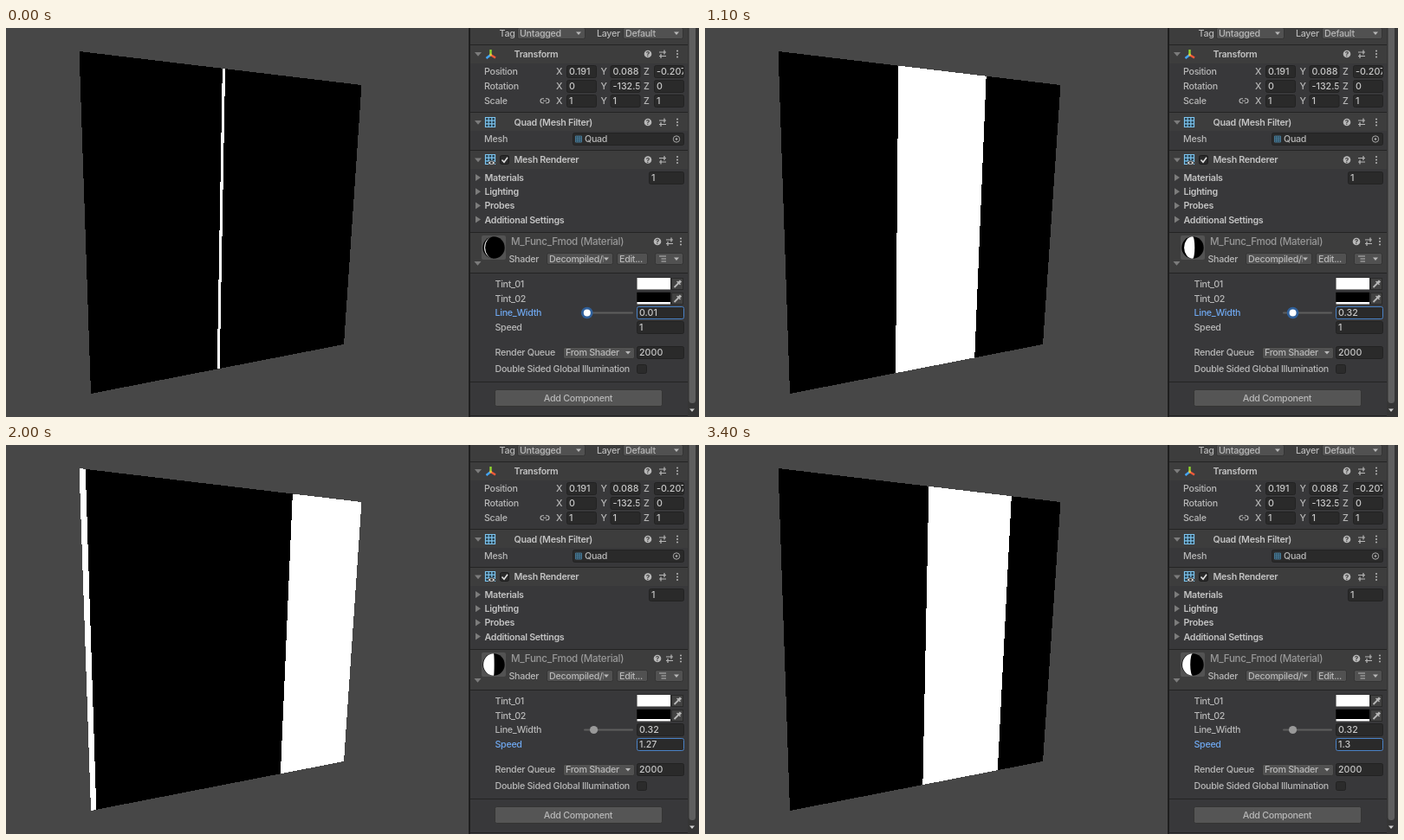
Write an HTML page that moves like this. It is 800 by 450 pixels and loops after 3500 ms.

```html
<!DOCTYPE html>
<html lang="en">
<head>
<meta charset="utf-8">
<title>Scrolling stripe shader</title>
<style>
html, body { margin: 0; width: 100%; height: 100%; overflow: hidden; background: #474747; }
svg { display: block; width: 800px; height: 450px; }
text { font: 500 10.7px Inter, "Liberation Sans", sans-serif; letter-spacing: -.3px; fill: #b8b8b8; white-space: pre; }
.bold { font-weight: 600; fill: #c4c4c4; }
.value { letter-spacing: 0; fill: #c8c8c8; }
.crisp { shape-rendering: crispEdges; }
</style>
</head>
<body>
<svg id="stage" viewBox="0 0 800 450" xmlns="http://www.w3.org/2000/svg"></svg>
<script>
const LOOP = 3500, STEP = 100;
const parts = [];
const add = markup => parts.push(markup);

const rect = (x, y, w, h, fill, more = '') =>
  add(`<rect x="${x}" y="${y}" width="${w}" height="${h}" fill="${fill}" ${more}/>`);
const path = (d, fill, more = '') => add(`<path d="${d}" fill="${fill}" ${more}/>`);
const stroke = (d, color = '#b8b8b8', width = 1.2) =>
  path(d, 'none', `stroke="${color}" stroke-width="${width}"`);
const circle = (x, y, r, fill, more = '') =>
  add(`<circle cx="${x}" cy="${y}" r="${r}" fill="${fill}" ${more}/>`);
// y is the vertical middle of the text row
const text = (x, y, s, more = '') => add(`<text x="${x}" y="${y + 3.9}" ${more}>${s}</text>`);
const bold = (x, y, s) => text(x, y, s, 'class="bold"');

const line = y => rect(536, y, 252, 1, '#242424');
const down = (x, y, size = 3.5, fill = '#b8b8b8') =>
  path(`M${x - size} ${y - size / 2}h${size * 2}l${-size} ${size * 1.2}z`, fill);
const right = (x, y) => path(`M${x - 3} ${y - 4}v8l6 -4z`, '#7c7c7c');

function field(x, y, w, value, id = '') {
  rect(x + .5, Math.floor(y) - 6.5, w - 1, 14, '#2a2a2a', `rx="2" stroke="#222" ${id && `id="${id}Box"`}`);
  add(`<svg x="${x}" y="${y - 8}" width="${w - 1}" height="16">
    <text class="value" x="3" y="11.9" ${id && `id="${id}Value"`}>${value}</text></svg>`);
}

function button(x, y, w, label = '', arrow = true) {
  rect(x + .5, Math.round(y) - 6.5, w - 1, 13, '#515151', 'rx="2" stroke="#343434"');
  const room = w - (arrow ? 11 : 2);
  add(`<svg x="${x}" y="${y - 8}" width="${room}" height="16"><text x="3" y="11.9">${label}</text></svg>`);
  if (arrow) down(x + w - 8, y, 3);
}

function headerIcons(y, help = 741, preset = 758, menu = 775) {
  circle(help, y, 4.3, '#b8b8b8');
  add(`<text x="${help}" y="${y + 3}" text-anchor="middle" style="font-size:8px;font-weight:700;fill:#3e3e3e;letter-spacing:0">?</text>`);
  stroke(`M${preset - 4} ${y - 2}h8m-2 -2.5v5M${preset - 4} ${y + 2.5}h8m-6 -2.5v5`);
  for (const dy of [-3.5, 0, 3.5]) circle(menu, y + dy, 1, '#b8b8b8');
}

function header(y, top, height, title) {
  rect(536, top, 252, height, '#3d3d3d');
  line(top - 1);
  down(545, y, 4, '#7c7c7c');
  bold(586.5, y, title);
  headerIcons(y);
}

function grid(x, y, size, color) {
  rect(x, y, size, size, '#263d4a');
  const s = size / 3;
  let d = `M${x} ${y}h${size}v${size}h${-size}z`;
  for (const k of [s, 2 * s]) d += `M${x + k} ${y}v${size}M${x} ${y + k}h${size}`;
  stroke(d, color, size > 9 ? 1.2 : .8);
}

function swatch(y, color) {
  rect(728, y - 7.5, 39.5, 14.5, '#222', 'rx="1"');
  rect(728.5, y - 7, 38.5, 11, color);
  rect(728.5, y + 4, 38.5, 2.5, '#fff');
  rect(768.5, y - 6.5, 13, 13, '#424242', 'stroke="#2a2a2a"');
  stroke(`M771.5 ${y + 4}l5 -5`, '#b8b8b8', 1.8);
  stroke(`M774.5 ${y - 3}l4 4`, '#b8b8b8', 1.2);
  stroke(`M776.5 ${y - 1}l2.5 -2.5`, '#b8b8b8', 3);
}

function buildScene() {
  rect(0, 0, 800, 450, '#474747');
  path('M84.5 27L410.5 66L390 366L98 423z', '#000', 'class="crisp"');
  path('', '#fff', 'id="stripe" class="crisp"');
}

function buildTopRows() {
  rect(534, 0, 266, 450, '#1e1e1e');
  rect(536, 0, 264, 450, '#38383a');
  rect(536, 0, 252, 19, '#3d3d3d');
  text(569.5, 6, 'Tag');
  button(590, 6, 79, 'Untagged');
  text(682, 6, 'Layer');
  button(712, 6, 70, 'Default');

  header(30, 20, 21, 'Transform');
  stroke('M559.5 32V25', '#8fd62e', 2.4);
  stroke('M559.5 31l-5 4', '#43a5f5', 2.4);
  stroke('M559.5 31l5.5 3.5', '#f2593a', 2.4);
  circle(559.5, 31, 1.4, '#e6c33a');

  const rows = [['Position', '0.191', '0.088', '-0.207'], ['Rotation', '0', '-132.5', '0'], ['Scale', '1', '1', '1']];
  rows.forEach(([name, ...values], i) => {
    const y = 50.5 + i * 17;
    text(552, y, name);
    values.forEach((value, k) => {
      text([635, 686.5, 736][k], y, 'XYZ'[k]);
      field([647, 697.5, 748][k], y, 35, value);
    });
  });
  stroke('M621 81.8h-1.5a2.5 2.5 0 0 0 0 5h1.5M623 81.8h1.5a2.5 2.5 0 0 1 0 5h-1.5M620 84.3h4', '#b8b8b8', 1.1);
}

function buildMeshRows() {
  header(109, 98, 21, 'Quad (Mesh Filter)');
  grid(553.5, 103.5, 11, '#7cc4ee');
  text(552, 128.5, 'Mesh');
  field(654, 128.5, 129, '');
  grid(657.5, 125, 7, '#4f86a5');
  text(668, 128.5, 'Quad');
  circle(774, 128.5, 3.7, 'none', 'stroke="#a8a8a8"');
  circle(774, 128.5, 1.3, '#a8a8a8');

  header(152.5, 142, 21, 'Mesh Renderer');
  grid(553.5, 146.5, 11, '#7cc4ee');
  path('M556 156q4.5 -5 9 0q-4.5 5 -9 0', '#d6d6d6', 'stroke="#333"');
  circle(560.5, 156, 1.4, '#333');
  rect(570.5, 147.5, 10, 10, '#2a2a2a', 'rx="2" stroke="#1c1c1c"');
  stroke('M572.5 152.5l2.5 2.8l4 -5.6', '#e0e0e0', 1.6);

  ['Materials', 'Lighting', 'Probes', 'Additional Settings'].forEach((name, i) => {
    const y = 173 + i * 16.2;
    right(545, y);
    bold(552.5, y, name);
  });
  field(742, 173, 41, '1');
}

function buildMaterial() {
  line(236);
  rect(536, 237, 252, 46, '#3d3d3d');
  line(283);
  rect(549, 240, 28, 28, '#535353', 'rx="2"');
  circle(563, 254, 12.7, '#000');
  path('', '#fff', 'id="ball"');
  text(583, 247, 'M_Func_Fmod (Material)', 'style="font-size:11.6px;fill:#989898"');
  headerIcons(247, 752, 766, 779);
  down(544.5, 272, 4, '#7c7c7c');
  text(580.5, 267, 'Shader');
  button(624, 267, 77, 'Decompiled/Fmod');
  button(705, 267, 36, 'Edit...', false);
  button(749, 267, 33);
  stroke('M754 264h8M756.5 267h5.5M756.5 270h5.5', '#b8b8b8', 1);

  text(564.5, 296, 'Tint_01');
  text(564.5, 313, 'Tint_02');
  swatch(296, '#fff');
  swatch(313, '#000');
  text(564.5, 329.5, 'Line_Width', 'id="widthLabel"');
  rect(667, 328.5, 57, 2, '#5e5e5e', 'rx="1"');
  circle(671, 329.5, 6.8, '#30609a', 'id="halo"');
  circle(671, 329.5, 4, '#fff', 'id="knob"');
  field(728, 329.5, 55, '', 'width');
  text(564.5, 346.5, 'Speed', 'id="speedLabel"');
  field(728, 346.5, 55, '', 'speed');

  text(564.5, 375.5, 'Render Queue');
  button(643, 375.5, 83, 'From Shader');
  field(728, 375.5, 55, '2000');
  text(564.5, 394, 'Double Sided Global Illumination');
  rect(728.5, 389.5, 11, 10, '#2b2b2b', 'rx="2" stroke="#222"');
  line(409);
  rect(564.5, 418.5, 193, 19, '#555', 'rx="2" stroke="#343434"');
  text(660.5, 428, 'Add Component', 'text-anchor="middle"');
  line(448);
}

function buildScrollbar() {
  rect(787, 0, 13, 450, '#353535');
  rect(788.5, -8, 7.5, 442, '#5f5f5f', 'rx="3.5"');
  down(792, 442, 3, '#d0d0d0');
}

buildScene();
buildTopRows();
buildMeshRows();
buildMaterial();
buildScrollbar();
const stage = document.getElementById('stage');
stage.innerHTML = parts.join('');

const node = id => document.getElementById(id);
const set = (id, name, value) => node(id).setAttribute(name, value);
const clamp = (v, lo, hi) => Math.min(hi, Math.max(lo, v));

// Point at u along an edge seen in perspective; ratio is far depth / near depth.
function along(x0, y0, x1, y1, ratio, u) {
  const s = u * ratio / (1 - u + u * ratio);
  return `${x0 + (x1 - x0) * s} ${y0 + (y1 - y0) * s}`;
}
const upper = u => along(84.5, 27, 410.5, 66, 1.347, u);
const lower = u => along(98, 423, 390, 366, 1.304, u);
const band = (a, b) => `M${upper(a)}L${upper(b)}L${lower(b)}L${lower(a)}z`;

// White part of the preview ball between two meridians, from -1 to 1.
function ballBand(a, b) {
  const r = 12.7, arc = (k, sweep) => `A${Math.abs(k) * r} ${r} 0 0 ${sweep} 563 `;
  return `M563 ${254 - r}` + arc(b, b > 0 ? 1 : 0) + (254 + r) + arc(a, a > 0 ? 0 : 1) + (254 - r) + 'z';
}
// The preview refreshes only now and then: start time, left and right meridian.
const previews = [[0, -.86, -.78], [.3, -.8, -.4], [.6, -.78, .18], [1.3, .15, 1],
  [1.8, -.94, .05], [2.2, .2, 1], [3.2, -.94, -.22]];

function focus(name, on) {
  node(name + 'Label').style.fill = on ? '#6fa8f0' : '';
  set(name + 'Box', 'stroke', on ? '#4a82c6' : '#222');
}

function draw(t) {
  const drag = clamp((t - .1) / .5, 0, 1);
  const width = Math.round(1 + 31 * drag) / 100;
  const speed = 1 + .03 * clamp(Math.round((t - 1.6) * 22.5), 0, 10);
  const onSpeed = t >= 1.6;

  const lag = .022 * Math.max(0, 1 - t / .8);
  const phase = 18.375 - speed * (11.92 + t) - lag;
  const start = phase - Math.floor(phase), end = start + width;
  set('stripe', 'd', band(start, Math.min(1, end)) + (end > 1 ? band(0, end - 1) : ''));

  const [, a, b] = previews.filter(p => p[0] <= t).pop();
  set('ball', 'd', ballBand(a, b));

  const x = 670.8 + 25 * (width - .01);
  set('halo', 'cx', x);
  set('knob', 'cx', x);
  set('halo', 'opacity', onSpeed ? 0 : 1);
  set('knob', 'fill', onSpeed ? '#999' : '#fff');
  set('knob', 'r', onSpeed ? 4.6 : 4);
  focus('width', !onSpeed);
  focus('speed', onSpeed);
  node('widthValue').textContent = width;
  node('speedValue').textContent = +speed.toFixed(2);
}

const began = performance.now();
function tick() {
  const ms = (performance.now() - began) % LOOP;
  draw(Math.floor(ms / STEP) * STEP / 1000);
  requestAnimationFrame(tick);
}
tick();
</script>
</body>
</html>
```
